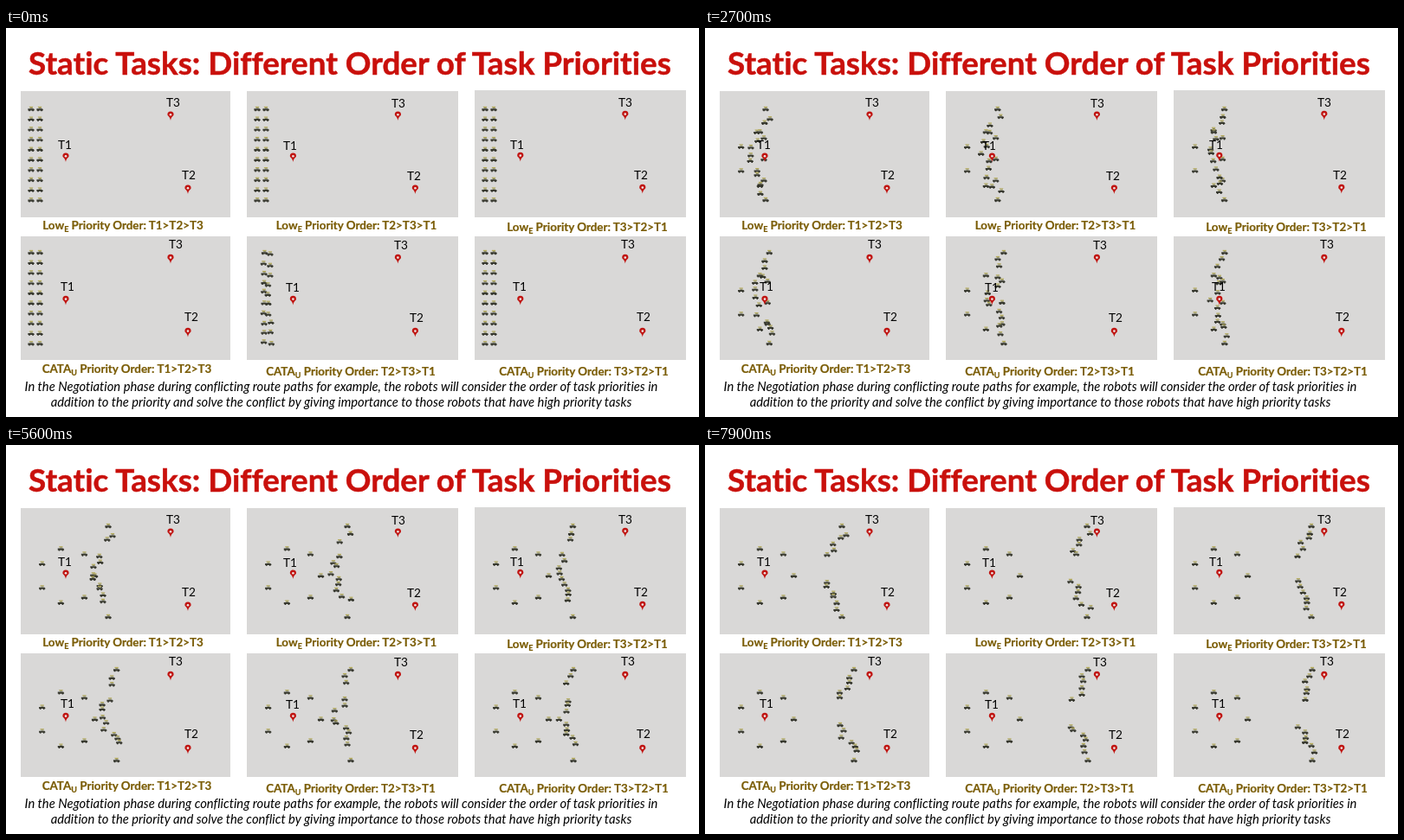
Write an HTML page that moves like this. It is 800 by 450 pixels and loops after 8000 ms.

```html
<!DOCTYPE html>
<html lang="en">
<head>
<meta charset="utf-8">
<title>Static Tasks</title>
<style>
html, body { margin: 0; width: 100%; height: 100%; overflow: hidden; background: #fff; }
svg { display: block; width: 800px; height: 450px; }
text { font-family: Lato, sans-serif; font-variant-ligatures: none; text-anchor: middle; }
.title { font-size: 36.8px; font-weight: 700; fill: #c9100c; stroke: #c9100c; stroke-width: .5px; }
.caption { font-size: 13.4px; font-weight: 700; fill: #7a5c05; stroke: #7a5c05; stroke-width: .2px; }
.sub { font-size: 9px; }
.task { font-size: 13.6px; fill: #000; }
.note { font-size: 14.75px; font-style: italic; fill: #000; }
</style>
</head>
<body>
<svg id="stage" viewBox="0 0 800 450">
  <defs>
    <g id="bot">
      <g transform="scale(.86)">
        <path d="M-2.5-3h5" stroke="#b5ab5c" stroke-width="1.4"/>
        <path d="M-1.5-1.6h3.5" stroke="#83845c" stroke-width="1.2"/>
        <path d="M-4.2-.8h7.5l1 1.2v1.2h-8.5z" fill="#3b3c32"/>
        <circle cx="-2.3" cy="1.7" r="1" fill="#2b2c25"/>
        <circle cx="2.4" cy="1.7" r="1" fill="#2b2c25"/>
      </g>
    </g>
    <g id="pin">
      <path d="M0 5C-1-.1-3.6 0-3.6-2A3.6 3.6 0 0 1 3.6-2C3.6 0 1-.1 0 5z" fill="#c01512"/>
      <circle cy="-1.8" r="1.3" fill="#eee4e2"/>
    </g>
  </defs>
  <text class="title" x="397" y="54">Static Tasks: Different Order of Task Priorities</text>
  <text class="note" x="387" y="420">In the Negotiation phase during conflicting route paths for example, the robots will consider the order of task priorities in</text>
  <text class="note" x="387" y="438">addition to the priority and solve the conflict by giving importance to those robots that have high priority tasks</text>
</svg>
<script>
const LOOP = 8000, STEP = 100, END = 7900;
const RING_SLOTS = [10, 6, 4, 8, 13, 16, 14];
const TASKS = [['T1', 69, 150, 68, 135], ['T2', 210, 187, 211, 170], ['T3', 190, 102, 193, 86]];
const stage = document.getElementById('stage');
const bots = [];

const mix = (a, b, k) => a + (b - a) * k;

// Walks through evenly timed values as u goes from 0 to 1.
function through(u, values) {
  const i = Math.min(Math.floor(u * (values.length - 1)), values.length - 2);
  return mix(values[i], values[i + 1], u * (values.length - 1) - i);
}

let seed = 7;
function jitter(size) {
  seed = seed * 16807 % 2147483647;
  return (seed / 2147483647 * 2 - 1) * size;
}

function add(tag, attrs, text = '') {
  const el = document.createElementNS('http://www.w3.org/2000/svg', tag);
  for (const k in attrs) el.setAttribute(k, attrs[k]);
  el.textContent = text;
  return stage.appendChild(el);
}

// Seven robots drive straight to a heptagon around T1 and stop there.
function ringPath(x, y, k, run) {
  const a = k * Math.PI * 2 / 7;
  const dx = 70.5 + 32 * Math.cos(a) - x, dy = 151.5 - 32 * Math.sin(a) - y;
  const length = Math.hypot(dx, dy);
  return (u, s) => {
    const k = Math.min(1, run * s / length);
    return [x + dx * k, y + dy * k];
  };
}

// The others sweep right in lanes: inner lanes lag, close up, then split to T3 or T2.
function sweepPath(x, y, j, run) {
  const outer = j % 12 == 0, inner = j > 2 && j < 12;
  const lag = outer ? 0 : 15 * Math.sin(j * Math.PI / 12) ** 2 + jitter(6);
  const lane = 94 + 8.75 * j + (outer ? 0 : jitter(3));
  const waist = inner ? mix(lane, 153, .32) : lane;
  const goal = outer ? lane : mix(lane, j < 6 ? 102 : 187, .3);
  return (u, s) => [
    mix(x, 31 - lag, Math.min(1, u * 3)) + run * s,
    through(u, [y, lane, waist, goal])
  ];
}

function panel(col, row, run, name, sub, order, capX, capY, lead = 0) {
  const dx = [0, 261, 524][col], dy = row * 166;
  const top = row ? 241 : col == 2 ? 72 : 73;
  add('rect', { x: [17, 278, 541][col], y: top, width: col ? 244 : 242,
    height: (row ? 384 : 219) - top, fill: '#d9d8d7' });
  for (let slot = 0, j = 0; slot < 20; slot++) {
    const x = 29 + slot % 2 * 10, y = 94 + (slot >> 1) * 11.7;
    const k = RING_SLOTS.indexOf(slot);
    const path = k < 0 ? sweepPath(x, y, j++, run) : ringPath(x, y, k, run);
    bots.push({ el: add('use', { href: '#bot' }), path, dx, dy, lead });
  }
  for (const [task, x, y, lx, ly] of TASKS) {
    add('use', { href: '#pin', x: x + col * 262.4, y: y + dy - (row || col == 2 ? .6 : 0) });
    add('text', { class: 'task', x: lx + dx + row * 3 - col,
      y: ly + dy - row * 2 + (col == 1) + 4.7 }, task);
  }
  const cap = add('text', { class: 'caption', x: capX, y: capY });
  cap.innerHTML = `${name}<tspan class="sub" dy="3">${sub}</tspan>` +
    `<tspan dy="-3"> Priority Order: ${order.replace(/>/g, '&gt;')}</tspan>`;
}

panel(0, 0, 127, 'Low', 'E', 'T1>T2>T3', 135, 233);
panel(1, 0, 149, 'Low', 'E', 'T2>T3>T1', 404.5, 232.5);
panel(2, 0, 145, 'Low', 'E', 'T3>T2>T1', 671, 234.5);
panel(0, 1, 141, 'CATA', 'U', 'T1>T2>T3', 139.5, 399);
panel(1, 1, 150, 'CATA', 'U', 'T2>T3>T1', 398, 402, .07);
panel(2, 1, 146, 'CATA', 'U', 'T3>T2>T1', 667, 402);

function frame(now) {
  const t = Math.min(Math.floor(now % LOOP / STEP) * STEP, END);
  for (const { el, path, dx, dy, lead } of bots) {
    const u = mix(lead, 1, t / END);
    const [x, y] = path(u, u ** 1.1);
    el.setAttribute('x', x + dx);
    el.setAttribute('y', y + dy);
  }
  requestAnimationFrame(frame);
}
frame(performance.now());
</script>
</body>
</html>
```
